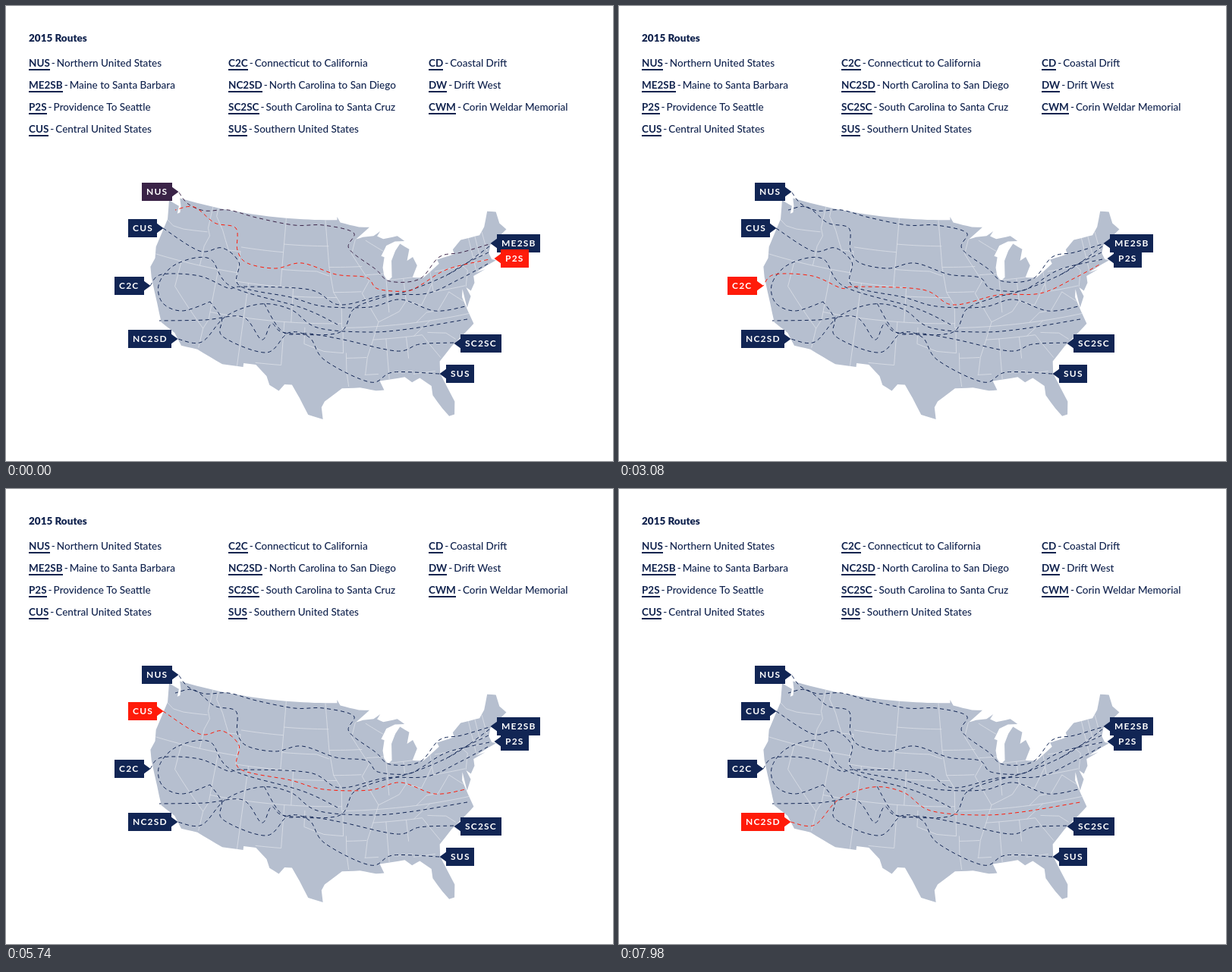
An HTML page with a canvas for the animation above (8000 ms loop, 800 by 600 pixels).

```html
<!DOCTYPE html>
<html lang="en">
<head>
<meta charset="utf-8">
<title>2015 Routes</title>
<style>
html, body { margin: 0; width: 100%; height: 100%; overflow: hidden; background: #fff; }
canvas { display: block; }
</style>
</head>
<body>
<canvas id="stage" width="800" height="600"></canvas>
<script>
const ctx = document.getElementById('stage').getContext('2d');
const NAVY = [17, 37, 84], RED = [255, 27, 9];
const INK = '#11234e', LAND = '#b6bfcf', BORDER = '#dce0e8';
const FONT = 'Lato, "Open Sans", sans-serif';
const LOOP = 8000, STEP = 70, TURN = 2100, LEAD = 210;
const FADE_IN = 180, FADE_OUT = 400, MARCH = 10;

// Geography in degrees west, degrees north
const COAST = {
  north: '123,49 95.15,49 95.15,49.38 94.6,48.7 91.4,48.1 89.6,48',
  lakes: `92,46.7 90.8,46.9 89,46.95 87.8,47.45 88.4,46.9 87.4,46.5 85,46.7 83.9,46 85.5,46.1 87,45.7 88,44.55
    87.5,44.4 87.9,43.2 87.8,42.3 87.3,41.6 86.6,42 86.4,43.9 85.6,45 84.7,45.75 83.3,45 83.9,43.7 82.9,44.05
    82.4,43 83.4,41.7 81.7,41.5 78.9,42.8 79.1,43.3 76.2,43.55 76.3,44.1 74.7,45`,
  atlantic: `71.5,45 70.4,45.8 69.2,47.45 67.8,47.1 67.8,45.7 67,44.8 70.2,43.6 70.8,42.7 70.6,41.95 70,41.7
    71.4,41.45 73.6,40.9 72,41.05 74,40.6 74.1,39.8 74.9,39 75.5,39.5 75.1,38.4 76,37.2 76.1,39.4 76.4,38.5
    76,36.9 75.55,35.25 76.6,34.65 77.95,33.9 79.2,33.2 81.2,31.7 81.4,30.3 80.1,26.8`,
  gulf: `80.4,25.3 81.1,25.2 81.8,26.2 82.8,27.9 82.8,29 84.2,30.1 85.3,29.7 86.2,30.4 89.6,30.2 89.1,29.1
    90.2,29.1 92.3,29.55 94.7,29.5 97,28 97.4,27.3`,
  south: `97.2,25.9 99.1,26.4 100.3,28.3 101.4,29.8 102.4,29.8 103.1,29 104.4,29.6 104.9,30.6 106.5,31.78
    108.2,31.78 108.2,31.33 111.07,31.33 114.8,32.5 117.1,32.53`,
  pacific: `118.4,33.8 120.6,34.6 121.9,36.6 123.8,39.3 124.4,40.4 124.1,41.5 124.5,42.8 124,46.25
    124.7,48.4 122.8,48.1 122.7,47.2 122.3,47.4 122.5,48.2`
};

// lon: from-to, then lat: from-to
const MERIDIANS = `120:39-42 117.03:46.4-49 117.03:42-44.3 114.05:36.1-42 109.05:31.3-41 111.05:41-44.5 104.05:41-49
  102.05:37-41 103.04:32-37 100:34.6-36.5 94.6:36.5-39.1 94.45:33.6-36.5 94.04:31.5-33.6 87.53:38-41.7 84.81:39.1-41.7
  80.52:39.7-42.2 88.3:30.3-35 85.4:32.5-35 73.4:41-45 72.3:42.7-45 71:43-45.3`;
const PARALLELS = `42:111.05-124.2 41:102.05-111.05 45:104.05-111.05 45.94:96.6-104.05 43:98.5-104.05 43.5:91.2-96.5
  40.6:91.5-95.8 40:95.3-102.05 37:94.6-114.05 36.5:75.9-94.6 35:83.1-90.2 33:91.2-94 31:89.7-91.6 31:85-87.6
  30.65:82-85 42.5:87.8-90.6 41.72:83.4-87.2 42:75.3-79.8 39.72:75.6-80.5 42.72:70.8-73.4 42.05:71.4-73.4 32:103.04-106.6`;
const RIVERS = [
  '124,46.2 122.8,45.7 121,45.65 117,46', '117,46.4 116.5,45.6 117.03,44.3',
  '116.05,49 116.05,48 114.6,46.6 113,44.4 111.05,44.5', '120,39 114.6,35 114.7,32.7', '114.05,36.1 114.6,35',
  '92.1,46.7 92.8,45 90.2,41.8 91.4,40.4 89.2,37 91.1,33 91.5,31', '97.2,49 96.5,43.5 95.8,40.6 94.6,39.1',
  '98.5,43 96.5,42.5', '89.2,37 86,38 84.8,39.1 82.6,38.4 80.6,40.6', '100,34.6 97.2,33.8 94.45,33.6',
  '94.04,31.5 93.8,29.7', '83.1,35 81,32.1', '82.3,35.2 79.7,34.8 78.5,33.9', '84.3,35 81.7,36.5',
  '83.7,36.5 82,37.5 80.3,37.5 78.2,39.4 76.3,38', '75.3,42 74.7,41.4 75.5,39.6', '90.4,46.5 87.6,45.1'
];

// Key points on the stage; the first five routes take the highlight in turn
const ROUTES = [
  '228,246 240,261 262,270 293,269 330,279 380,289 418,289 458,299 452,320 487,347 506,363 545,360 571,331 600,325 637,314',
  '637,334 582,347 548,367 528,376 490,373 475,358 435,354 390,339 355,346 318,339 305,322 303,293 275,286 248,265 223,269',
  '635,340 598,360 555,379 500,381 440,394 400,374 312,370 293,372 255,356 205,354 190,369',
  '207,293 255,323 285,319 307,338 308,369 375,384 418,396 480,397 520,387 565,402 606,396',
  '608,413 530,426 475,430 410,424 375,400 335,393 290,409 258,443 226,439',
  '637,317 590,350 535,374 490,386 458,400 438,431 368,431 350,419 337,440 312,410 262,414 202,415',
  '590,444 545,446 515,455 445,440 400,432 365,430 340,392',
  '571,485 510,483 480,496 420,467 400,437 372,431 343,457 286,436 284,412 269,390',
  '437,420 390,398 297,370 268,333 225,340 202,365 206,391 232,402 269,390',
  '636,325 605,340 580,356'
];

const LEGEND = [
  [30, 'NUS|Northern United States', 'ME2SB|Maine to Santa Barbara', 'P2S|Providence To Seattle', 'CUS|Central United States'],
  [293, 'C2C|Connecticut to California', 'NC2SD|North Carolina to San Diego', 'SC2SC|South Carolina to Santa Cruz', 'SUS|Southern United States'],
  [557, 'CD|Coastal Drift', 'DW|Drift West', 'CWM|Corin Weldar Memorial']
];

// text, left, top, width, side of the pointer, route index
const TAGS = [
  ['NUS', 179, 233, 40, 1, 0], ['CUS', 161, 281, 38, 1, 3], ['C2C', 143, 357, 39, 1, 2], ['NC2SD', 161, 427, 57, 1, 4],
  ['ME2SB', 647, 301, 57, -1, 5], ['P2S', 652, 321, 37, -1, 1], ['SC2SC', 599, 433, 54, -1, 6], ['SUS', 580, 473, 37, -1, 7]
];

const words = s => s.trim().split(/\s+/);
const points = s => words(s).map(p => p.split(',').map(Number));
const rad = d => d * Math.PI / 180;

// Albers equal-area conic projection, standard parallels 29.5 and 45.5
const S1 = Math.sin(rad(29.5)), CONE = (S1 + Math.sin(rad(45.5))) / 2;
const CONE_C = 1 - S1 * S1 + 2 * CONE * S1;
function project(west, north) {
  const r = 650 * Math.sqrt(CONE_C - 2 * CONE * Math.sin(rad(north))) / CONE;
  const a = CONE * rad(96 - west);
  return [430 + r * Math.sin(a), r * Math.cos(a) - 434];
}

// Long edges are subdivided so that parallels curve
function geo(pts) {
  const path = new Path2D();
  path.moveTo(...project(...pts[0]));
  for (let i = 1; i < pts.length; i++) {
    const [a, b] = pts[i - 1], [c, d] = pts[i];
    const n = Math.ceil(Math.abs(c - a) + 0.01);
    for (let k = 1; k <= n; k++) path.lineTo(...project(a + (c - a) * k / n, b + (d - b) * k / n));
  }
  return path;
}

// Catmull-Rom curve through the key points
function smooth(s) {
  const pts = points(s), path = new Path2D();
  const at = i => pts[Math.min(pts.length - 1, Math.max(0, i))];
  path.moveTo(...pts[0]);
  for (let i = 0; i < pts.length - 1; i++) {
    const [p, q, r, t] = [at(i - 1), at(i), at(i + 1), at(i + 2)];
    path.bezierCurveTo(q[0] + (r[0] - p[0]) / 6, q[1] + (r[1] - p[1]) / 6,
      r[0] - (t[0] - q[0]) / 6, r[1] - (t[1] - q[1]) / 6, ...r);
  }
  return path;
}

function grid(s, place) {
  return words(s).map(w => {
    const [fixed, from, to] = w.split(/[:-]/).map(Number);
    return geo([place(fixed, from), place(fixed, to)]);
  });
}

const land = geo(points(Object.values(COAST).join(' ')));
const borders = [
  ...grid(MERIDIANS, (lon, lat) => [lon, lat]),
  ...grid(PARALLELS, (lat, lon) => [lon, lat]),
  ...RIVERS.map(s => geo(points(s)))
];
const routes = ROUTES.map(smooth);

const clamp = v => Math.min(1, Math.max(0, v));
const mix = a => `rgb(${NAVY.map((c, i) => Math.round(c + (RED[i] - c) * a)).join()})`;

// cubic-bezier(.25, .1, .25, 1)
function ease(x) {
  let lo = 0, hi = 1, s = 0.5;
  const curve = (a, b) => 3 * a * s * (1 - s) ** 2 + 3 * b * s * s * (1 - s) + s ** 3;
  for (let i = 0; i < 18; i++) {
    if (curve(0.25, 0.25) < x) lo = s; else hi = s;
    s = (lo + hi) / 2;
  }
  return curve(0.1, 1);
}

function write(text, x, y, weight, size = 13.5) {
  ctx.font = `${weight} ${size}px ${FONT}`;
  ctx.fillText(text, x, y);
  return ctx.measureText(text).width;
}

function drawLegend() {
  ctx.fillStyle = INK;
  write('2015 Routes', 30, 47, 900);
  for (const [x, ...rows] of LEGEND) {
    rows.forEach((row, i) => {
      const [code, name] = row.split('|'), y = 80 + 29 * i;
      const w = write(code, x, y, 700);
      ctx.fillRect(x, y + 3, Math.round(w), 2);
      write('-', x + w + 2, y, 500);
      write(name, x + w + 9, y, 500);
    });
  }
}

function drawMap() {
  ctx.setLineDash([]);
  ctx.fillStyle = LAND;
  ctx.fill(land);
  ctx.save();
  ctx.clip(land);
  ctx.strokeStyle = BORDER;
  ctx.lineWidth = 0.8;
  borders.forEach(b => ctx.stroke(b));
  ctx.restore();
}

function drawRoute(i, heat, offset) {
  ctx.strokeStyle = mix(heat);
  ctx.lineWidth = 1;
  ctx.setLineDash([5, 4]);
  ctx.lineDashOffset = offset;
  ctx.stroke(routes[i]);
}

function drawTag([text, x, y, w, side, route], heat) {
  const edge = side > 0 ? x + w : x, mid = y + 12;
  ctx.fillStyle = mix(heat(route));
  ctx.fillRect(x, y, w, 24);
  ctx.beginPath();
  ctx.moveTo(edge - side, mid - 7);
  ctx.lineTo(edge + side * 8.5, mid);
  ctx.lineTo(edge - side, mid + 7);
  ctx.fill();
  ctx.fillStyle = '#fff';
  ctx.letterSpacing = '1.2px';
  write(text, x + 6, y + 16, 700, 12);
  ctx.letterSpacing = '0px';
}

function draw(t) {
  const turn = Math.floor((t + LEAD) / TURN), since = (t + LEAD) % TURN;
  const active = turn + 1;
  const heat = i => i === active ? ease(clamp(since / FADE_IN))
    : i === turn ? 1 - ease(clamp(since / FADE_OUT)) : 0;
  ctx.fillStyle = '#fff';
  ctx.fillRect(0, 0, 800, 600);
  drawLegend();
  drawMap();
  routes.forEach((r, i) => { if (i !== active) drawRoute(i, heat(i), 0); });
  drawRoute(active, heat(active), -MARCH * since / 1000);
  TAGS.forEach(tag => drawTag(tag, heat));
}

const start = performance.now();
function tick() {
  const t = (performance.now() - start) % LOOP;
  draw(Math.floor(t / STEP) * STEP);
  requestAnimationFrame(tick);
}
tick();
</script>
</body>
</html>
```
